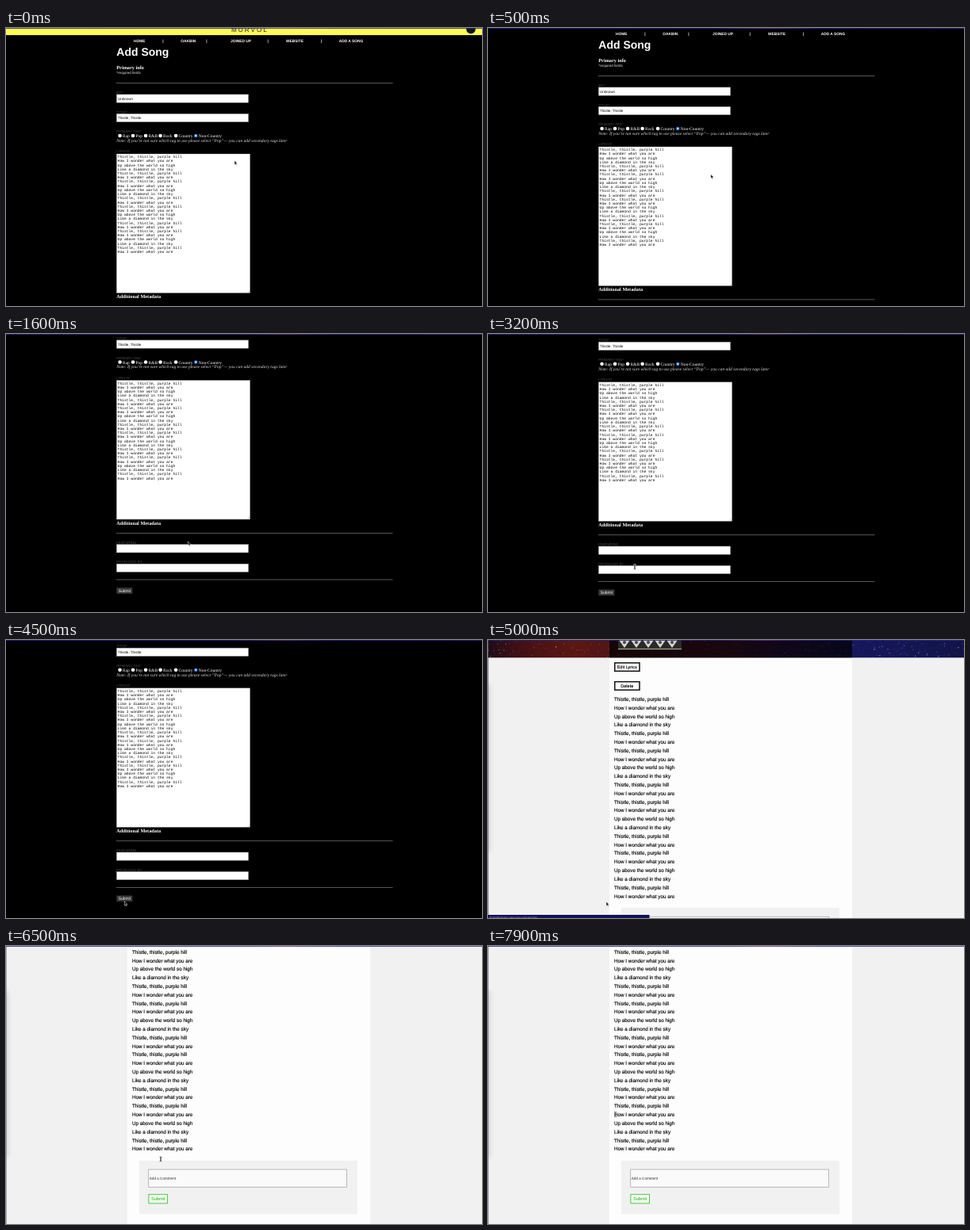
Write an HTML page that moves like this. It is 600 px wide and 351 px high and loops after 8 s.

```html
<!DOCTYPE html>
<html lang="en">
<head>
<meta charset="utf-8">
<title>Add a song</title>
<style>
html, body { margin: 0; width: 100%; height: 100%; overflow: hidden; background: #000; }
svg { display: block; }
text { white-space: pre; text-rendering: geometricPrecision; }
.sans { font-family: "Liberation Sans", Arial, sans-serif; }
.serif { font-family: "Liberation Serif", "Times New Roman", serif; }
.mono { font-family: "Liberation Mono", "Courier New", monospace; }
.bold { font-weight: bold; }
.italic { font-style: italic; }
.mid { text-anchor: middle; }
#song text { stroke: currentColor; stroke-width: .14; }
</style>
</head>
<body>
<svg width="600" height="351" viewBox="0 0 600 351">
  <defs>
    <linearGradient id="space">
      <stop offset="0" stop-color="#1c0d18"/>
      <stop offset=".07" stop-color="#431014"/>
      <stop offset=".18" stop-color="#5a1812"/>
      <stop offset=".3" stop-color="#4c1418"/>
      <stop offset=".5" stop-color="#5a1834"/>
      <stop offset=".62" stop-color="#341a58"/>
      <stop offset=".78" stop-color="#15175c"/>
      <stop offset="1" stop-color="#121448"/>
    </linearGradient>
    <linearGradient id="edge">
      <stop offset="0" stop-color="#22228a"/>
      <stop offset=".48" stop-color="#24228a"/>
      <stop offset=".58" stop-color="#5c3088"/>
      <stop offset=".7" stop-color="#24228a"/>
      <stop offset="1" stop-color="#342688"/>
    </linearGradient>
    <filter id="soft" x="-20" y="-.1" width="41" height="1.2"><feGaussianBlur stdDeviation="3.5"/></filter>
  </defs>
  <g id="formView"><rect width="600" height="351"/><g id="form"></g></g>
  <g id="songView">
    <rect width="600" height="351" fill="#f1f1f1"/>
    <rect x="153" width="306" height="351" fill="#fdfdfd"/>
    <rect x="-3" y="57" width="4" height="210" opacity=".22" filter="url(#soft)"/>
    <g id="song"></g>
    <rect width=".6" height="351" fill="#556" opacity=".8"/>
    <g id="status">
      <rect y="347" width="203.5" height="5" fill="#12125a"/>
      <text class="sans" x="2" y="351.8" font-size="4.4" fill="#99a">Establishing secure connection…</text>
    </g>
  </g>
  <rect width="600" height=".8" fill="url(#edge)"/>
  <path id="arrow" d="M0 0V5.2L1.2 4.1 2 6 2.9 5.6 2.1 3.8H3.7Z" stroke="#fff" stroke-width=".5"/>
  <g id="beam" fill="none">
    <path d="M-1.4-3Q0-3 0-2V2Q0 3-1.4 3M1.4-3Q0-3 0-2V2Q0 3 1.4 3" stroke="#fff" stroke-width="1.5"/>
    <path d="M-1.4-3Q0-3 0-2V2Q0 3-1.4 3M1.4-3Q0-3 0-2V2Q0 3 1.4 3" stroke="#222" stroke-width=".7"/>
  </g>
</svg>
<script>
const $ = id => document.getElementById(id);
const text = (s, x, y, size, cls = "sans", fill = "#000", extra = "") =>
  `<text x="${x}" y="${y}" font-size="${size}" class="${cls}" fill="${fill}" color="${fill}" ${extra}>${s.replace(/&/g, "&amp;")}</text>`;
const box = (x, y, w, h, fill, stroke = "none", width = 0) =>
  `<rect x="${x}" y="${y}" width="${w}" height="${h}" fill="${fill}" stroke="${stroke}" stroke-width="${width}"/>`;
const dot = (x, y, r, fill) => `<circle cx="${x}" cy="${y}" r="${r}" fill="${fill}"/>`;

const verse = ["Thistle, thistle, purple hill", "How I wonder what you are",
  "Up above the world so high", "Like a diamond in the sky"];
const lyrics = Array.from({ length: 24 }, (_, i) => verse[[0, 1, 2, 3, 0, 1][i % 6]]);
const lines = (x, y, pitch, size, cls) =>
  lyrics.map((s, i) => text(s, x, y + i * pitch, size, cls)).join("");

function formPage() {
  const rule = y => box(139, y, 348.5, .8, "#6c6c6c");
  const heading = (s, y) => text(s, 139.3, y, 6.27, "serif bold", "#fff");
  const label = (s, y) => text(s, 139.3, y, 4.4, "sans", "#484848");
  const field = (name, y, value = "") => label(name, y - .6) +
    box(139.4, y + .2, 166.2, 10.3, "#fff", "#888", .5) + text(value, 141, y + 7, 4.55);
  const nav = [["HOME", 168.3], ["|", 198], ["OAKBIN", 229.7], ["|", 253], ["JOINED UP", 296],
    ["|", 330.3], ["WEBSITE", 364], ["|", 397.5], ["ADD A SONG", 435]];
  const tags = [["Rap", 147], ["Pop", 163.5], ["R&B", 179.5], ["Rock", 198], ["Country", 217.5], ["Non-Country", 242.7]];
  return box(0, 0, 600, 9, "#fffb54") +
    text("MURVOL", 284, 5.3, 8.2, "sans", "#222", 'letter-spacing="2"') +
    dot(586, 1.5, 5.8, "#111") +
    nav.map(([s, x]) => text(s, x, 17.8, 4.85, "sans bold mid", "#fff")).join("") +
    text("Add Song", 139.3, 35, 14, "sans bold", "#fff") +
    heading("Primary info", 51.5) +
    text("*required fields", 139.3, 58, 4.57, "sans", "#ddd") +
    rule(69.2) +
    field("BY*", 83.7, "Unknown") +
    field("TITLE*", 108.1, "Thistle, Thistle") +
    label("PRIMARY TAG*", 132) +
    tags.map(([s, x], i) => dot(x - 3.4, 136, 2.3, i == 5 ? "#2f7de1" : "#fff") +
      (i == 5 ? dot(x - 3.4, 136, .9, "#fff") : "") + text(s, x, 138.2, 5.5, "serif", "#fff")).join("") +
    text("Note: If you’re not sure which tag to use please select “Pop”— you can add secondary tags later",
      139.3, 143.9, 5.54, "serif italic", "#ddd") +
    label("LYRICS*", 157.2) +
    box(139.4, 159, 168.2, 175.5, "#fff", "#999", .4) +
    `<path d="M304.5 334L307.2 331.3M306 334L307.2 332.8" stroke="#888" stroke-width=".4"/>` +
    lines(140.6, 164.2, 5.21, 4.66, "mono") +
    heading("Additional Metadata", 341.3) +
    rule(351.5) +
    field("FEATURING", 366) +
    field("PRODUCED BY", 390.5) +
    rule(410.2) +
    box(139.4, 420.8, 20, 7.6, "#3a3a3a") +
    text("Submit", 149.4, 426.3, 4.95, "sans mid", "#fff");
}

function songPage() {
  let seed = 7;
  const random = () => (seed = seed * 16807 % 2147483647) / 2147483647;
  let sky = box(0, 0, 600, 22.3, "url(#space)");
  for (let i = 0; i < 700; i++) {
    const x = random() * 600, y = random() * 21.5;
    const hue = x < 320 ? 345 + random() * 30 : 225 + random() * 40;
    const r = .2 + random() * .6, light = 12 + random() ** 2 * 55;
    sky += dot(x.toFixed(1), y.toFixed(1), r.toFixed(2), `hsl(${hue | 0} 50% ${light | 0}%)`);
  }
  // The content column dims the sky behind it.
  sky += box(153, 0, 306, 22.3, "rgba(0,0,0,.72)");
  let cover = box(164, -50, 80, 62, "#2b2a28");
  for (let x = 165; x < 240; x += 15)
    cover += `<path d="M${x} 0L${x + 7} 10L${x + 14} 0Z" fill="#d8d4c8"/>` + dot(x + 7, 3, 2, "#4a4740");
  cover += box(164, 10.8, 80, 1.2, "#aaa493");
  const button = (s, y) => box(159.8, y, 31.2, 10.4, "#fff", "#111", 1.5) + text(s, 175.3, y + 7, 5.5, "sans mid");
  return sky + cover + button("Edit Lyrics", 28.9) + button("Delete", 52.7) +
    lines(159, 76.9, 10.81, 6.3, "sans") +
    box(168, 338.2, 275, 67.4, "#f1f1f1") +
    box(179.7, 349.3, 249.8, 22.3, "#fafafa", "#aaa", .8) +
    text("Add a Comment", 180.8, 362.3, 4.6, "sans", "#666") +
    box(179.9, 380.9, 23.6, 11.2, "#fff", "#52cc45", 1.1) +
    text("Submit", 191.7, 388.3, 5.6, "sans mid", "#45c238");
}

$("form").innerHTML = formPage();
$("song").innerHTML = songPage();

// Each key is [time, ...values]; values are interpolated linearly.
function track(keys, t) {
  const i = keys.findIndex(k => k[0] > t);
  if (i < 0) return keys[keys.length - 1].slice(1);
  const a = keys[Math.max(i - 1, 0)], b = keys[i];
  const p = Math.max(0, (t - a[0]) / (b[0] - a[0]));
  return a.slice(1).map((v, j) => v + (b[j + 1] - v) * p);
}
const formScroll = [[200, 0], [500, 9], [900, 33], [1200, 56.7], [1400, 82], [1500, 96], [1600, 100.5], [1700, 100], [2000, 98.2]];
const pointer = [[0, 288, 167.5], [300, 288, 167.5], [1200, 256, 245], [1600, 229.5, 262], [2000, 206, 283],
  [2600, 158, 326], [2900, 166, 318], [3200, 185, 294], [3600, 182, 298], [4300, 150, 329], [4600, 149, 330.5],
  [5200, 149, 330.5], [5700, 191, 272], [6000, 193, 268.5], [6500, 195, 269], [7000, 218, 238],
  [7400, 216, 206], [7500, 179, 204], [7700, 179, 204], [7900, 160.5, 212.5]];
const beamTimes = [[3100, 3700], [5700, 8000]];
const ease = p => (p = Math.min(1, Math.max(0, p)), p * p * (3 - 2 * p));
const move = (el, x, y) => el.setAttribute("transform", `translate(${x} ${y})`);
const show = (el, on) => el.style.display = on ? "" : "none";

function draw(now) {
  const t = Math.floor(now % 8000 / 100) * 100;
  const onSong = t >= 4800;
  show($("formView"), !onSong);
  show($("songView"), onSong);
  show($("status"), t < 5500);
  move($("form"), 0, -track(formScroll, t)[0]);
  move($("song"), 0, -67.2 * ease((t - 5300) / 1130));
  const [x, y] = track(pointer, t);
  const isBeam = beamTimes.some(([from, to]) => t >= from && t < to);
  show($("beam"), isBeam);
  show($("arrow"), !isBeam);
  move(isBeam ? $("beam") : $("arrow"), x, y);
  requestAnimationFrame(draw);
}
draw(0);
</script>
</body>
</html>
```
